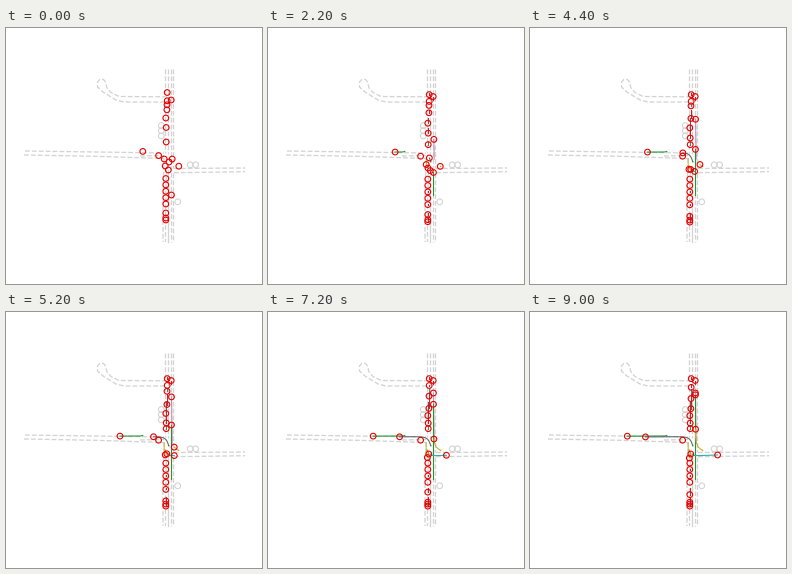
Write a matplotlib script that moves like this. It is 256 px wide and 256 px high and loops after 9100 ms.

```python
import numpy as np
import matplotlib.pyplot as plt
from matplotlib.animation import FuncAnimation

SIZE, DPI = 256, 100
FRAMES, STEP = 91, 100
PX = 72 / DPI
CLOCK = np.arange(FRAMES) * STEP / 1000
RED, GREEN = "#b03030", "#259436"

plt.rcParams["path.simplify"] = False
fig = plt.figure(figsize=(SIZE / DPI, SIZE / DPI), dpi=DPI, facecolor="white")
ax = fig.add_axes([0, 0, 1, 1])
ax.set_xlim(0, SIZE)
ax.set_ylim(SIZE, 0)
ax.axis("off")


def road(*points, style="--"):
    x, y = zip(*points)
    ax.plot(x, y, style, color="lightgray", lw=1.3 * PX, zorder=1)


def rings(points, color, z):
    return ax.scatter(*np.transpose(points), s=(5.7 * PX) ** 2, facecolors="none",
                      edgecolors=color, linewidths=1.1 * PX, zorder=z)


def ramp(center, width):
    """Distance covered at unit speed after a soft start around center."""
    soft = width * np.logaddexp(0, (CLOCK - center) / width)
    return soft - soft[0]


cars = []


def car(color, route, speed=0, go=None, stop=None, soft=0.35):
    """Follow a polyline: cruise at speed, softly starting at go, braking at stop."""
    route = np.array(route, float)
    dist = CLOCK if go is None else ramp(go, soft)
    if stop is not None:
        dist = dist - ramp(stop, soft)
    miles = np.r_[0, np.cumsum(np.hypot(*np.diff(route, axis=0).T))]
    path = np.column_stack([np.interp(speed * dist, miles, c) for c in route.T])
    # a slight creep leaves a dot as the trail of idle cars
    path[:, 1] += 0.6 * (1 - np.exp(-4 * CLOCK))
    line, = ax.plot([], [], color=color, lw=1.1 * PX, zorder=3)
    cars.append((path, line))


def north(color, x, y, *drive, **kw):
    car(color, [(x, y), (x, y - 100)], *drive, **kw)


def south(color, x, y, *drive, **kw):
    car(color, [(x, y), (x, y + 100)], *drive, **kw)


# main road
road((159, 41), (159, 68))
road((158.5, 75), (158.5, 125))
road((158, 130), (157, 170), (157, 214))
road((162, 41), (162, 126))
road((160.5, 142), (159.5, 180), (159.5, 214))
road((162.4, 142), (162.4, 214), style="-")
road((165, 41), (165, 214))
road((167, 41), (167, 140))
road((167.4, 145), (167.4, 214))
# west and east arms
road((19, 123), (90, 124), (158, 125))
road((18, 127), (90, 128.3), (158, 130.5))
road((134, 128), (158, 127.5))
road((168, 140.5), (239, 140))
road((168, 144.7), (239, 143.7))
# north-west loop
road((161, 68.8), (113, 68.5), (105, 64.5), (101, 60), (99.5, 54), (97.5, 51.5),
     (94, 51.3), (91.5, 54), (91.5, 59), (97, 64), (110, 72), (118, 74), (161, 74))

parked = [(155.3, 97.5 + 5.2 * i) for i in range(3)]
parked += [(184.2, 136.8), (189.6, 136.8), (171.7, 173.8)]
rings(parked, "lightgray", 2)

# northbound
car("#c58fb5", [(166.2, 131), (165.4, 79)], 9.2, stop=5.5)
north(GREEN, 165.45, 167, 10.5, stop=8.1)
north(RED, 165.2, 72, 4, stop=1)

# across and around the junction
car(GREEN, [(136.8, 123.4), (90, 123.6)], 4.39)
car("#5f6b6b", [(163, 134), (162.2, 131.5), (161, 128.5), (159.5, 126.5),
                (157, 125), (153, 124.3), (146, 124.1), (90, 124.5)],
    9.6, go=3.3, soft=1.8)
car("#c9b12f", [(172.8, 138.2), (168.2, 134.5), (166.4, 130), (165.6, 124),
                (165.5, 90)], 6, go=5, soft=1.3)
car("#2bb0a8", [(162.3, 142), (164, 142.8), (168, 143), (200, 142)], 5.1, go=4)
car("#b9c53a", [(158.2, 131), (158.2, 136), (159.3, 143), (159.3, 160)],
    2.25, stop=6.5, soft=0.8)
car("#c9792f", [(159.2, 138), (160.8, 141), (160.8, 150)], 0.72, stop=5.3)
south(RED, 152.6, 127.6)

# southbound
south(RED, 161.2, 64.5, 1.5, stop=1)
south(RED, 161.2, 72.8, 1.5, go=7.7)
south("#2b8f8f", 161, 76.8, 2.5, go=4.5, stop=8.2)
south("#a83232", 160.9, 81.8, 2.6, go=1.3, stop=6.8)
south("#8a4a4a", 159.8, 90, 2.1, stop=6.2)
south(RED, 160.2, 99.5, 2.3, stop=4.8)
south("#3d8c5a", 160.2, 114, 2, stop=1)

# queue south of the junction
for i in range(4):
    south(RED, 159.8, 150.5 + 6.4 * i)
south(RED, 159.8, 176, 1.4, go=4.7)
south(RED, 159.8, 185, 0.8, go=1, stop=6.8)
for y in (190, 192):
    south(RED, 159.8, y, 0.5, stop=3)

heads = rings([path[0] for path, _ in cars], "#e60000", 4)


def draw(n):
    heads.set_offsets([path[n] for path, _ in cars])
    for path, line in cars:
        trail = path[:n + 1] if n else path[:0]
        line.set_data(trail[:, 0], trail[:, 1])
    return [heads] + [line for _, line in cars]


anim = FuncAnimation(fig, draw, frames=FRAMES, interval=STEP, repeat=True,
                     repeat_delay=0, init_func=lambda: draw(0))
plt.show()
```
